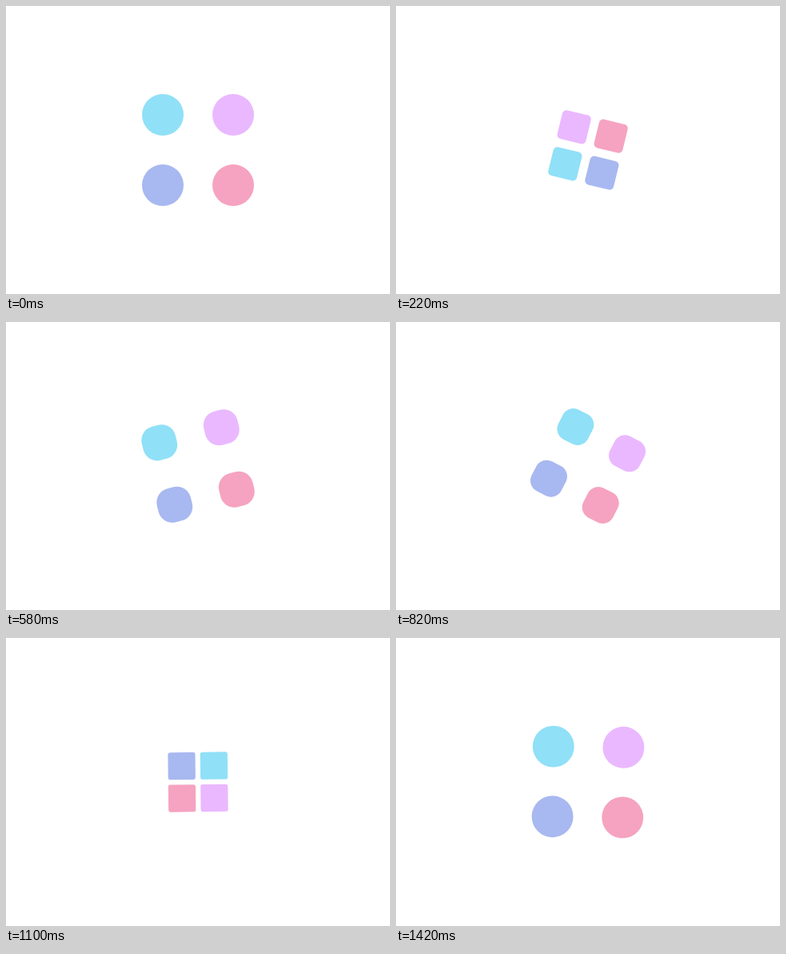
These frames come from a looping animation (480x360 px, 1440 ms). An HTML page:

```html
<!DOCTYPE html>
<html lang="en">
<head>
<meta charset="utf-8">
<title>Four dot loader</title>
<style>
html, body { margin: 0; width: 100%; height: 100%; overflow: hidden; background: #fff; }
svg { display: block; width: 480px; height: 360px; }
</style>
</head>
<body>
<svg viewBox="0 0 480 360">
  <g id="ring">
    <rect fill="#90e0f7"/>
    <rect fill="#eab8ff"/>
    <rect fill="#a8b8f0"/>
    <rect fill="#f5a3c0"/>
  </g>
</svg>
<script>
const LOOP = 1440, STEP = 20;
const ring = document.getElementById('ring');
const tiles = [...ring.children];

// One pose per quarter loop; round is the corner radius as a share of size.
const wide = { turn: 0, gap: 44, size: 52, round: 0.5 };
const mid = { turn: 0, gap: 43.5, size: 45, round: 0.47 };
const square = turn => ({ turn, gap: 20, size: 34, round: 0.08 });
const poses = [wide, square(-90), mid, square(90), wide];

function bezier(x1, y1, x2, y2) {
  const at = (u, a, b) => 3 * u * (1 - u) ** 2 * a + 3 * u * u * (1 - u) * b + u ** 3;
  return x => {
    let lo = 0, hi = 1;
    for (let i = 0; i < 30; i++) {
      const u = (lo + hi) / 2;
      if (at(u, x1, x2) < x) lo = u; else hi = u;
    }
    return at(lo, y1, y2);
  };
}
const ease = bezier(0.38, 0, 0.2, 0.9);

function draw(ms) {
  const time = Math.floor((ms % LOOP) / STEP + 1e-3) * STEP % LOOP;
  const phase = time / LOOP * 4;
  const i = Math.floor(phase);
  const k = ease(phase - i);
  const mix = key => poses[i][key] + (poses[i + 1][key] - poses[i][key]) * k;
  const gap = mix('gap'), size = mix('size'), radius = size * mix('round');

  ring.setAttribute('transform', `translate(240 180) rotate(${mix('turn')})`);
  tiles.forEach((tile, n) => {
    const box = {
      x: (n % 2 ? gap : -gap) - size / 2,
      y: (n > 1 ? gap : -gap) - size / 2,
      width: size, height: size, rx: radius
    };
    for (const name in box) tile.setAttribute(name, box[name]);
  });
}

function tick() {
  draw(performance.now());
  requestAnimationFrame(tick);
}
tick();
</script>
</body>
</html>
```
